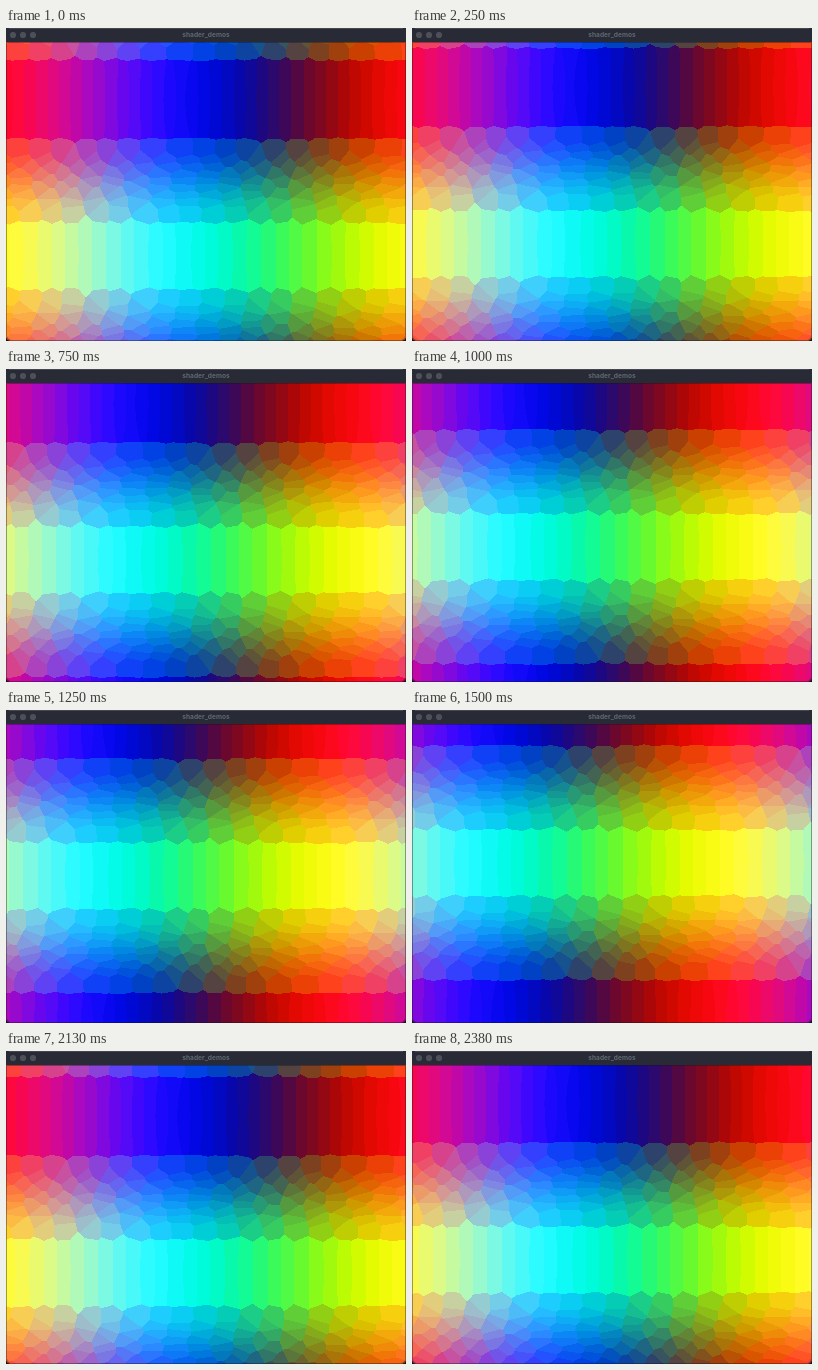
These frames come from a looping animation (400 by 313 pixels, 2510 ms). An HTML page with a canvas:

```html
<!DOCTYPE html>
<html lang="en">
<head>
<meta charset="utf-8">
<title>shader_demos</title>
<style>
  html, body { margin: 0; width: 100%; height: 100%; overflow: hidden; background: #15151b; }
  canvas { display: block; }
</style>
</head>
<body>
<canvas id="stage" width="400" height="313"></canvas>
<script>
const W = 400, H = 299, BAR = 14, TAU = Math.PI * 2;
const LOOP = 2510, STEPS = 20, CYCLE = 16;

// The view spans 6 radians each way, so a whole period is a little larger.
const TILE_W = Math.round(W * TAU / 6), TILE_H = Math.round(H * TAU / 6);
const ctx = document.getElementById('stage').getContext('2d');

const wave = a => 127.5 + 127.5 * Math.cos(a);

let seed = 7;
const random = () => (seed = seed * 16807 % 2147483647) / 2147483647;

// Limited palette: fine hue steps at both ends of green, coarser ones between.
const palette = [];
function addRow(green, count, jitter) {
  const offset = random();
  for (let i = 0; i < count; i++) {
    const a = (i + offset + (random() - 0.5) * jitter) / count * TAU;
    palette.push([wave(a), green + (random() - 0.5) * jitter * 12, wave(a + 4)]);
  }
}
addRow(8, 36, 0.25);
for (let k = 0; k < 9; k++) addRow(66 + k * 17.5, 18, 0.3);
addRow(250, 30, 0.25);

function nearest(r, g, b) {
  let best, least = Infinity;
  for (const c of palette) {
    const d = (r - c[0]) ** 2 + (g - c[1]) ** 2 + (b - c[2]) ** 2;
    if (d < least) { least = d; best = c; }
  }
  return best;
}

// One full period in both directions; time only scrolls it.
function makeTile() {
  const tile = document.createElement('canvas');
  tile.width = TILE_W;
  tile.height = TILE_H;
  const tctx = tile.getContext('2d');
  const image = tctx.createImageData(TILE_W, TILE_H);
  for (let y = 0, p = 0; y < TILE_H; y++) {
    const green = wave(y / TILE_H * TAU + 2);
    for (let x = 0; x < TILE_W; x++, p += 4) {
      const a = x / TILE_W * TAU;
      image.data.set([...nearest(wave(a), green, wave(a + 4)), 255], p);
    }
  }
  tctx.putImageData(image, 0, 0);
  return tile;
}
const tile = makeTile();

function drawBar() {
  ctx.fillStyle = '#282a35';
  ctx.fillRect(0, 0, W, BAR);
  ctx.fillStyle = '#454650';
  ctx.fillRect(3, 0, W - 6, 1);
  ctx.fillStyle = '#4e5059';
  for (const x of [7, 17, 27]) {
    ctx.beginPath();
    ctx.arc(x, 7, 3.1, 0, TAU);
    ctx.fill();
  }
  ctx.font = 'bold 6.6px Inter, sans-serif';
  ctx.textAlign = 'center';
  ctx.textBaseline = 'middle';
  ctx.fillStyle = '#5f6a72';
  ctx.fillText('shader_demos', 200, 6.7);
}

function drawShader(time) {
  const shift = size => -Math.round(time / TAU % 1 * size);
  const x = shift(TILE_W), y = BAR + shift(TILE_H);
  ctx.save();
  ctx.beginPath();
  ctx.roundRect(0, BAR, W, H, [0, 0, 5, 5]);
  ctx.clip();
  for (const dx of [0, TILE_W]) {
    for (const dy of [0, TILE_H]) ctx.drawImage(tile, x + dx, y + dy);
  }
  ctx.strokeStyle = 'rgba(20, 20, 26, 0.4)';
  ctx.beginPath();
  ctx.roundRect(0.5, BAR + 0.5, W - 1, H - 1, [0, 0, 5, 5]);
  ctx.stroke();
  ctx.restore();
}

const begin = performance.now();
function draw() {
  const ms = Math.max(0, performance.now() - begin) % LOOP;
  const step = Math.min(STEPS - 1, Math.floor(Math.floor(ms / 10) / 12.5));
  ctx.fillStyle = '#15151b';
  ctx.fillRect(0, 0, W, BAR + H);
  drawShader((step % CYCLE) * 0.125);
  drawBar();
  requestAnimationFrame(draw);
}
draw();
</script>
</body>
</html>
```
